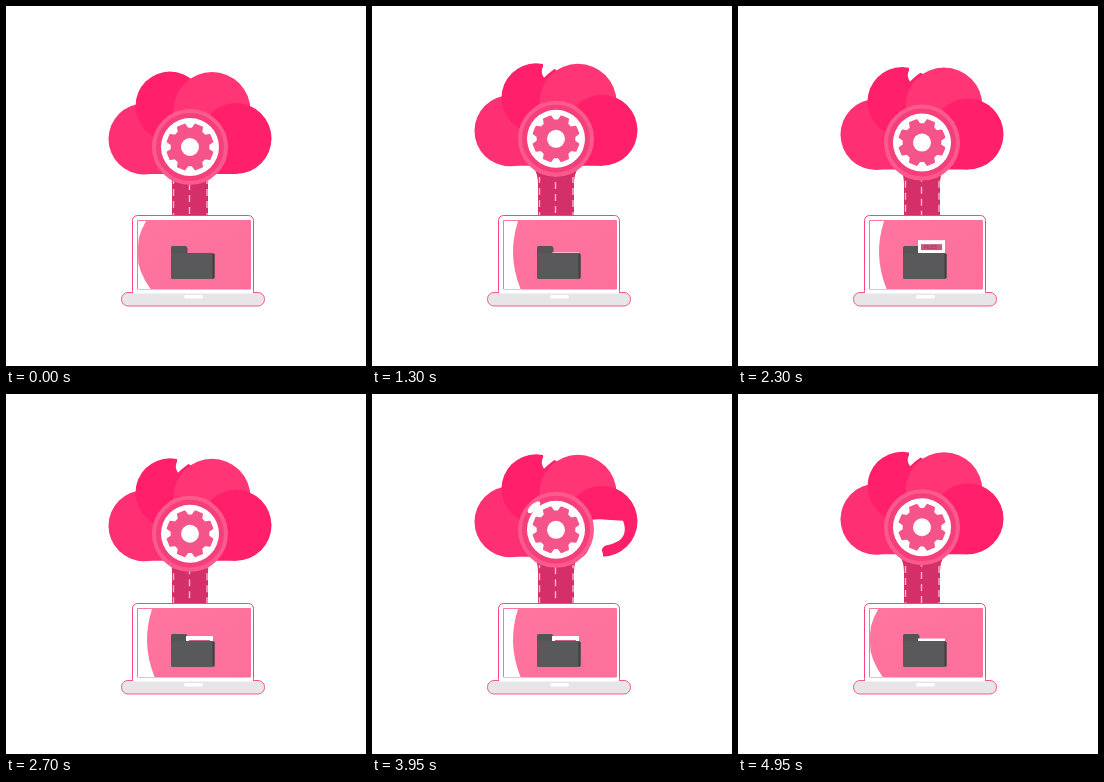
Animation, 360 px wide and 360 px high, one loop 5 s. Source, as an HTML page:

```html
<!DOCTYPE html>
<html lang="en">
<head>
<meta charset="utf-8">
<title>Cloud upload</title>
<style>
  html, body { margin: 0; width: 100%; height: 100%; overflow: hidden; background: #fff; }
  svg { display: block; width: 100vw; height: 100vh; }
  text { font: 700 5px Roboto, sans-serif; }
</style>
</head>
<body>
<svg viewBox="0 0 360 360">
  <defs>
    <linearGradient id="screen" x2="1" y2="1">
      <stop offset="0" stop-color="#ff769f"/>
      <stop offset="1" stop-color="#fb6f9a"/>
    </linearGradient>
    <clipPath id="pocket"><path d="M170 200h50v47h-50z"/></clipPath>
  </defs>

  <!-- pipe -->
  <path d="M161 160H207Q202 168 202 178V210H166V178Q166 168 161 160Z" fill="#d42f69"/>
  <g id="flow" fill="none" stroke="#fbb4ca" stroke-width="1.4" stroke-dasharray="7 5">
    <path d="M167.500 171V210M201 171V210"/>
    <path d="M183.500 165V210"/>
  </g>

  <g id="cloud">
    <path d="M138 168H184V80H160L130 110Z" fill="#ff2f74"/>
    <path d="M184 168H230L240 120L205 80H184Z" fill="#ff1f6a"/>
    <circle cx="138" cy="133" r="35.500" fill="#ff2f74"/>
    <circle cx="164" cy="100" r="34.500" fill="#ff1f6b"/>
    <circle cx="206" cy="104.500" r="38.500" fill="#ff3575"/>
    <circle cx="230" cy="132.500" r="35.500" fill="#ff1f6a"/>
    <path id="notch" fill="#fff"/>
    <path id="bite" fill="#fff" d="M219 131Q228 130 235 131L251 132Q256 145 247 152Q240 156 233 157Q228 160 231 165V174H205L214 165Q222 153 219 131Z"/>
    <circle cx="184" cy="141" r="36" fill="#f53f7a" stroke="#fc5a8d" stroke-width="4"/>
    <circle cx="184" cy="141" r="29" fill="#fff"/>
    <path id="gear" fill="#f5548a" stroke="#f5548a" stroke-width="2" stroke-linejoin="round"/>
    <circle cx="184" cy="141" r="9" fill="#fff"/>
    <ellipse id="glint" cx="162" cy="118.500" rx="8" ry="3.500" fill="#fff" transform="rotate(-42 162 118.500)"/>
  </g>

  <!-- laptop -->
  <rect x="126.500" y="209.500" width="121" height="80" rx="5" fill="#fff" stroke="#f5447f"/>
  <rect x="131" y="214" width="114" height="69.500" rx="1" fill="url(#screen)"/>
  <path id="shine" fill="#fff"/>
  <rect x="115.500" y="286.500" width="143" height="13.500" rx="6.500" fill="#e7e5e7" stroke="#f5588c"/>
  <path d="M127 286H247" stroke="#fff" stroke-width="3"/>
  <rect x="178" y="289" width="19" height="3.500" rx="1.700" fill="#fff"/>

  <!-- folder -->
  <path d="M165 241.500Q165 240 166.500 240H180L181.500 242V250H165Z" fill="#545456"/>
  <g clip-path="url(#pocket)">
    <g id="sheet">
      <path d="M180 0H207V30H180Z" fill="#fff"/>
      <path d="M183 4H204V10H183Z" fill="#c85a7f"/>
      <text x="186" y="8.800" fill="#a83c62">FILES</text>
      <path d="M196 18H203V23H196Z" fill="#f59ab5"/>
    </g>
  </g>
  <rect x="165" y="247" width="43.500" height="26" rx="1.500" fill="#59595b"/>
  <path d="M207.500 248V272" stroke="#3f3f41" stroke-width="2"/>
</svg>

<script>
const LOOP = 5000, STEP = 50, BOB = 3080, LIFT = 1250;
const $ = id => document.getElementById(id);
const show = (id, on) => $(id).setAttribute('visibility', on ? 'visible' : 'hidden');
const shift = (id, y) => $(id).setAttribute('transform', `translate(0 ${y})`);

// Smooth 0-1-0 pulse around a moment of the loop
function pulse(t, at, reach) {
  const d = Math.abs(t - at), near = Math.min(d, LOOP - d) / reach;
  return near < 1 ? (1 + Math.cos(Math.PI * near)) / 2 : 0;
}

function gearPath(cx, cy, teeth, inner, outer) {
  const pitch = 2 * Math.PI / teeth, pts = [];
  for (let i = 0; i < teeth; i++) {
    for (const [f, r] of [[-.33, inner], [-.2, outer], [.2, outer], [.33, inner]]) {
      const a = (i + .5 + f) * pitch - Math.PI / 2;
      pts.push((cx + r * Math.cos(a)).toFixed(2) + ' ' + (cy + r * Math.sin(a)).toFixed(2));
    }
  }
  return 'M' + pts.join('L') + 'Z';
}

// White strip with a curved right edge; it shrinks to two corners or leans at the foot
function shinePath(shrink, lean) {
  let d = 'M132 215';
  for (let u = 0; u <= 1; u += .125) {
    const x = 141 - 10 * shrink + (25 + 20 * shrink) * (u - .45) ** 2 + 9 * lean * u;
    d += `L${Math.max(132, x).toFixed(2)} ${215 + 68 * u}`;
  }
  return d + 'H132Z';
}

function notchPath(wide) {
  const left = 171 - 8 * wide, x = 172 - 10 * wide, y = 80 + 7 * wide;
  return `M${left} 60V69Q${left - 3} ${y - 6} ${x} ${y}Q${x + 9} ${71 + 4 * wide} 192 66V60Z`;
}

function draw(t) {
  const p = t % LIFT / LIFT, wide = pulse(t, 3350, 600);
  shift('cloud', -4.35 * (1 - Math.cos(2 * Math.PI * t / BOB)));
  shift('sheet', 248 - 26 * Math.min(p / .7, (1 - p) / .3));
  $('flow').setAttribute('stroke-dashoffset', p * 24);
  $('notch').setAttribute('d', notchPath(wide));
  $('shine').setAttribute('d', shinePath(pulse(t, 0, 500), wide));
  show('notch', t >= 300);
  show('bite', pulse(t, 3950, 150) > 0);
  show('glint', Math.abs(t % BOB - 820) < 200);
}

$('gear').setAttribute('d', gearPath(184, 141, 8, 18.5, 23));
const start = performance.now();
function tick() {
  const t = (performance.now() - start) % LOOP;
  draw(Math.floor(t / STEP) * STEP);
  requestAnimationFrame(tick);
}
tick();
</script>
</body>
</html>
```
